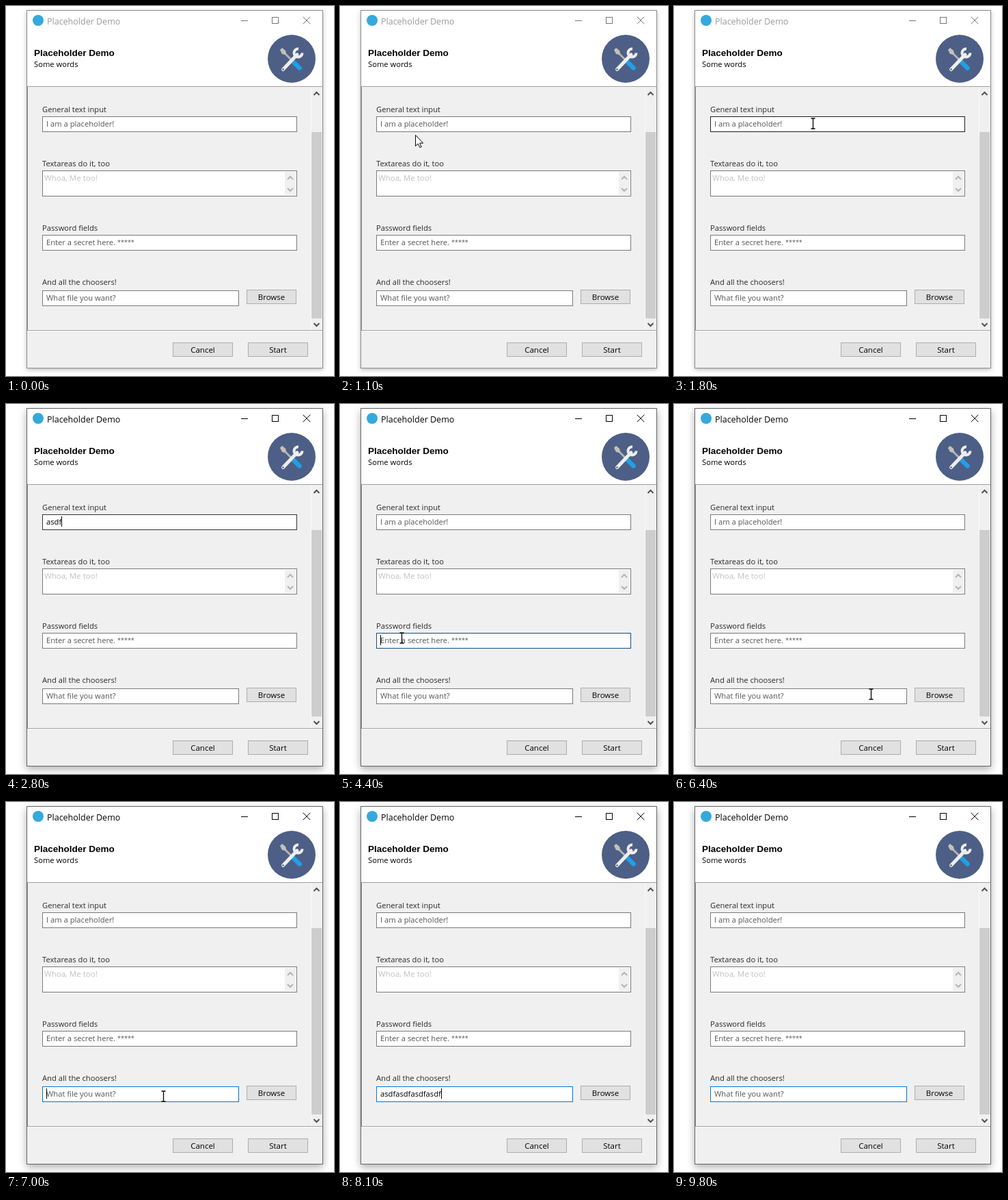
Write an HTML page that moves like this. It is 480 px wide and 540 px high and loops after 10000 ms.

```html
<!DOCTYPE html>
<html lang="en">
<head>
<meta charset="utf-8">
<title>Placeholder Demo</title>
<style>
html, body { margin: 0; width: 100%; height: 100%; overflow: hidden; background: #fff; }
svg { display: block; width: 480px; height: 540px; font: 11.2px "Open Sans", "Noto Sans", sans-serif; }
text { white-space: pre; }
.label { fill: #2a2a2a; }
.hint { fill: #555; }
.button rect { fill: #e1e1e1; stroke: #adadad; }
.button text { text-anchor: middle; font-size: 11.5px; }
.chevron { fill: none; stroke: #505050; stroke-width: 2; }
.faint { stroke: #b4b4b4; }
#win { fill: #f0f0f0; }
#glyphs { fill: none; stroke-width: 1; }
</style>
</head>
<body>
<svg viewBox="0 0 480 540" id="stage">
  <rect id="win" x="30.5" y="6.5" width="433" height="522"/>
  <rect x="31" y="7" width="432" height="110" fill="#fff"/>
  <path d="M31 117.5H463M31 473.5H463" stroke="#a0a0a0"/>
  <path d="M31 474.5H463" stroke="#fff"/>
  <path d="M31.5 118V473" stroke="#8c8c8c"/>
  <circle cx="47" cy="21" r="8" fill="#35a9dc"/>
  <text id="title" x="60" y="27" font-size="12.5">Placeholder Demo</text>
  <g id="glyphs">
    <path d="M344 21.5h10M389.5 16.5h9v9h-9z" shape-rendering="crispEdges"/>
    <path d="M434.7 15.7l10.6 10.6M445.3 15.7l-10.6 10.6"/>
  </g>
  <text x="41" y="73" style="font:bold 13.5px 'Liberation Sans',Arial,sans-serif">Placeholder Demo</text>
  <text x="41" y="89">Some words</text>

  <g id="tools">
    <circle cx="418" cy="77" r="35" fill="#4d5f86"/>
    <path d="M405.5 66.500L419 80" stroke="#b3b3b3" stroke-width="3"/>
    <path d="M401 64l3-3 5 4 1 4-2 2-4-1z" fill="#c4c0ba"/>
    <path d="M421 82l8.500 8.500" stroke="#1fa0e8" stroke-width="6.500" stroke-linecap="round"/>
    <path d="M405.500 92.500L426 71" stroke="#eee" stroke-width="5" stroke-linecap="round"/>
    <path d="M428 62.500a6 6 0 1 0 5.500 6" fill="none" stroke="#eee" stroke-width="4"/>
    <circle cx="405.500" cy="92.500" r="1.300" fill="#4d5f86"/>
  </g>

  <g class="label">
    <text x="53" y="155">General text input</text>
    <text x="53" y="234">Textareas do it, too</text>
    <text x="53" y="328">Password fields</text>
    <text x="53" y="407">And all the choosers!</text>
  </g>

  <rect x="53.5" y="240.500" width="372" height="37" fill="#fff" stroke="#7a7a7a"/>
  <rect x="408" y="242" width="16" height="34" fill="#f0f0f0"/>
  <text x="56" y="255" font-size="11.5" fill="#c0c0c0">Whoa, Me too!</text>
  <path class="chevron faint" d="M412 253l4-4 4 4M412 266l4 4 4-4"/>

  <g id="fields"></g>
  <g id="buttons"></g>

  <path d="M446.500 118V473" stroke="#fafafa"/>
  <rect x="447" y="184" width="15" height="272" fill="#cdcdcd"/>
  <path class="chevron" d="M450.500 130l4-4 4 4M450.500 463l4 4 4-4"/>

  <path id="arrow" fill="#fff" stroke="#000" stroke-width="1" d="M.5.5v16l3.700-3.500 2.600 5.500 2.400-1-2.500-5.400h5z"/>
  <path id="beam" fill="none" stroke="#000" stroke-width="1.300" d="M-3-7.500h2.300l.7.7.7-.7H3M0-7V7M-3 7.500h2.300l.7-.7.7.7H3"/>
</svg>
<script>
const NS = "http://www.w3.org/2000/svg";
const LOOP = 10000, STEP = 100;
const GREY = "#7a7a7a", DARK = "#1e1e1e", BLUE = "#0078d7";
const $ = id => document.getElementById(id);

function add(parent, tag, attrs, text) {
  const el = document.createElementNS(NS, tag);
  for (const k in attrs) el.setAttribute(k, attrs[k]);
  if (text) el.textContent = text;
  return parent.appendChild(el);
}
const show = (el, on) => { el.style.display = on ? "" : "none"; };

// Last row whose time has been reached
function at(rows, t) {
  let row = rows[0];
  for (const r of rows) if (r[0] <= t) row = r;
  return row;
}

const dots = n => "\u25cf".repeat(n);
const keys = n => "asdf".repeat(n);

// border: [time, colour]; states: [time, typed text, caret, selected]
const specs = [
  { y: 161, w: 372, hint: "I am a placeholder!",
    border: [[0, GREY], [1400, DARK], [2300, "#333"], [4200, GREY]],
    states: [[0, "", 0], [2200, "", 1], [2500, "a", 1], [2600, "as", 1], [2700, "asd", 1],
      [2800, "asdf", 1], [2900, "asdf", 0, 1], [3000, "", 1], [3600, "", 0]] },
  { y: 334, w: 372, hint: "Enter a secret here. ", stars: "*****", secret: true,
    border: [[0, GREY], [4100, DARK], [4300, "#0b4f8a"], [4500, BLUE], [6300, GREY]],
    states: [[0, "", 0], [4300, "", 1], [4700, dots(2), 1], [4800, dots(4), 1], [4900, dots(6), 1],
      [5000, dots(8), 1], [5100, dots(10), 1], [5600, dots(10), 0, 1], [5800, "", 1], [6300, "", 0]] },
  { y: 415, w: 287, hint: "What file you want?",
    border: [[0, GREY], [6500, DARK], [6700, BLUE]],
    states: [[0, "", 0], [6600, "", 1], [7100, "", 0], [7500, "", 1], [7900, keys(1), 1],
      [8000, keys(2), 1], [8100, keys(4), 1], [8600, keys(8) + "as", 1],
      [8700, keys(8) + "as", 0, 1], [8800, "", 0], [9300, "", 1], [9800, "", 0]] }
];

// Runs of pointer motion: [time, x, y]; the pointer is hidden after each run's end
const runs = [
  { end: 2500, pts: [[100, 434, 416], [300, 330, 345], [500, 150, 345], [700, 47, 250],
    [900, 70, 200], [1200, 130, 182], [1600, 203, 171]] },
  { end: 4700, pts: [[3000, 205, 230], [3100, 207, 309], [3600, 207, 309], [3900, 140, 330],
    [4100, 90, 341], [4400, 90, 341], [4600, 276, 380]] },
  { end: 7500, pts: [[6000, 276, 382], [6300, 288, 423], [6500, 288, 423], [6800, 230, 429],
    [7000, 230, 429], [7300, 404, 421]] }
];

function pointer(t) {
  const run = runs.find(r => t >= r.pts[0][0] && t < r.end);
  if (!run) return null;
  const i = run.pts.findIndex(p => p[0] > t);
  if (i < 0) return run.pts[run.pts.length - 1].slice(1);
  const a = run.pts[i - 1], b = run.pts[i];
  const u = (t - a[0]) / (b[0] - a[0]);
  return [1, 2].map(k => Math.round(a[k] + (b[k] - a[k]) * u));
}

const fields = specs.map(s => {
  const g = $("fields"), base = s.y + 15;
  const box = add(g, "rect", { x: 53.5, y: s.y + .5, width: s.w, height: 22, fill: "#fff" });
  const sel = add(g, "rect", { x: 57, y: s.y + 2, height: 17, fill: BLUE });
  const hint = add(g, "text", { x: 59, y: base, class: "hint" }, s.hint);
  if (s.stars) add(hint, "tspan", { dy: -1, "font-size": 9 }, s.stars);
  const font = s.secret ? "font:9px 'DejaVu Sans',sans-serif" : "";
  const typed = add(g, "text", { x: 59, y: base, style: font });
  const caret = add(g, "rect", { y: s.y + 3, width: 1, height: 15 });
  return { ...s, box, sel, hint, typed, caret };
});

for (const [x, y, w, name] of [[352, 414, 73, "Browse"], [244, 491, 88, "Cancel"], [354, 491, 88, "Start"]]) {
  const g = add($("buttons"), "g", { class: "button" });
  add(g, "rect", { x: x + .5, y: y + .5, width: w - 1, height: 20 });
  add(g, "text", { x: x + w / 2, y: y + 15 }, name);
}

function drawField(f, t) {
  const [, text, caret, selected] = at(f.states, t);
  f.box.setAttribute("stroke", at(f.border, t)[1]);
  f.typed.textContent = text;
  f.typed.setAttribute("fill", selected ? "#fff" : "#000");
  const len = text ? f.typed.getComputedTextLength() : 0;
  f.sel.setAttribute("width", len + 2);
  f.caret.setAttribute("x", 59 + Math.round(len));
  show(f.hint, !text);
  show(f.sel, selected);
  show(f.caret, caret);
}

function drawWindow(active) {
  $("title").setAttribute("fill", active ? "#000" : "#999");
  $("glyphs").setAttribute("stroke", active ? "#000" : "#777");
  $("win").setAttribute("stroke", active ? "#666" : "#8c8c8c");
  $("win").style.filter = active
    ? "drop-shadow(0 4px 6px rgba(0,0,0,.32))"
    : "drop-shadow(0 2px 3px rgba(0,0,0,.26))";
}

function drawPointer(t) {
  const p = pointer(t);
  const over = p && specs.some(s => p[0] > 53 && p[0] < 53 + s.w && p[1] > s.y && p[1] < s.y + 23);
  show($("arrow"), p && !over);
  show($("beam"), over);
  if (p) {
    const shift = over ? .5 : 0;
    $(over ? "beam" : "arrow").setAttribute("transform", `translate(${p[0] + shift} ${p[1] + shift})`);
  }
}

function draw(now) {
  const t = Math.floor(now % LOOP / STEP) * STEP;
  drawWindow(t >= 2100);
  for (const f of fields) drawField(f, t);
  drawPointer(t);
}

function tick() {
  draw(performance.now());
  requestAnimationFrame(tick);
}
tick();
</script>
</body>
</html>
```
